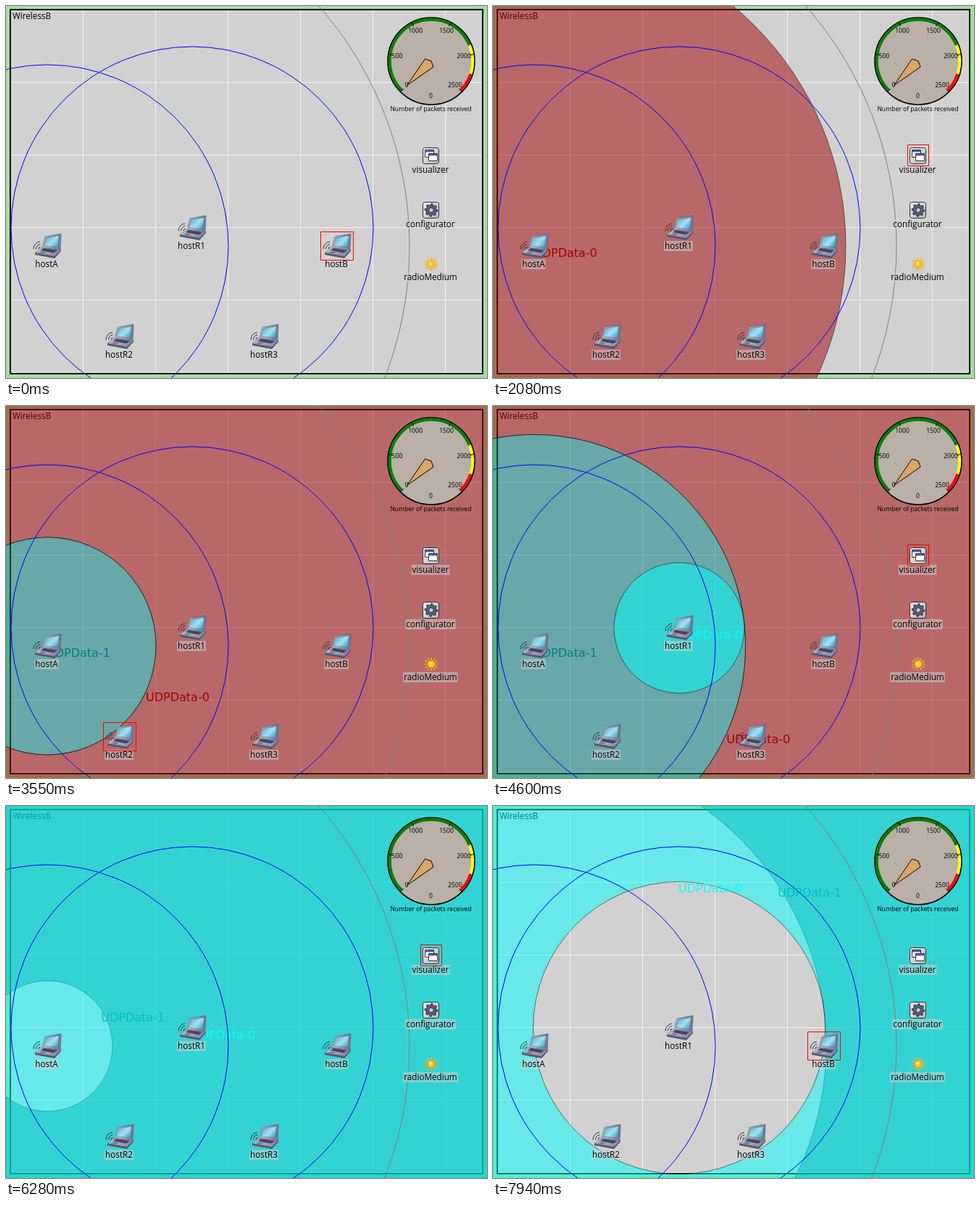
Write an HTML page with a canvas that moves like this. It is 664 px wide and 513 px high and loops after 8 s.

```html
<!DOCTYPE html>
<html lang="en">
<head>
<meta charset="utf-8">
<title>Wireless signal propagation</title>
<style>
  html, body { margin: 0; width: 100%; height: 100%; overflow: hidden; background: #a0e0a0; }
  canvas { display: block; }
</style>
</head>
<body>
<canvas id="stage" width="664" height="513"></canvas>
<script>
const ctx = document.getElementById('stage').getContext('2d');
const TAU = Math.PI * 2, FAR = 1000, LOOP = 8000;
const LABEL_FONT = '11.7px "Open Sans", "Noto Sans", sans-serif';
const SMALL_FONT = '8.6px "Open Sans", "Noto Sans", sans-serif';
const SIGNAL_FONT = '16px "DejaVu Sans", sans-serif';

const hosts = {
  hostA: [57, 331], hostR1: [257, 306], hostB: [457, 331],
  hostR2: [157, 456], hostR3: [357, 456]
};
const [A, R1] = [hosts.hostA, hosts.hostR1];
const HOP = Math.hypot(R1[0] - A[0], R1[1] - A[1]);

// [start ms, highlighted module, phase, wave radius around hostA]
// phase 1: first packet spreads, 2: second packet spreads and R1 relays, 3: both fade out
const steps = [
  [0, 'hostB', 0, 0], [210, 'hostA', 0, 0],
  [630, 'visualizer', 1, 40], [840, 'visualizer', 1, 100], [1040, 'visualizer', 1, 160],
  [1250, 'visualizer', 1, 220], [1460, 'visualizer', 1, 280], [1670, 'visualizer', 1, 340],
  [1870, 'visualizer', 1, 400], [2080, 'visualizer', 1, 430], [2290, 'visualizer', 1, FAR],
  [2710, 'hostA', 1, FAR],
  [3340, 'visualizer', 2, 90], [3550, 'hostR2', 2, 150], [3760, 'visualizer', 2, 190],
  [3970, 'hostR1', 2, HOP],
  [4390, 'visualizer', 2, HOP + 30], [4600, 'visualizer', 2, HOP + 90],
  [4810, 'visualizer', 2, HOP + 150], [5020, 'visualizer', 2, HOP + 180],
  [5230, 'visualizer', 2, HOP + 198], [5440, 'visualizer', 2, HOP * 2],
  [5650, 'hostA', 2, FAR],
  [6070, 'visualizer', 3, 30], [6280, 'visualizer', 3, 90], [6490, 'hostR2', 3, 150],
  [6700, 'visualizer', 3, 190], [6900, 'hostR1', 3, HOP], [7110, 'visualizer', 3, HOP + 30],
  [7320, 'visualizer', 3, HOP + 90], [7530, 'visualizer', 3, HOP + 150],
  [7740, 'visualizer', 3, HOP + 180], [7940, 'hostB', 3, HOP * 2]
];

function poly(points, fill, stroke, width = 1) {
  ctx.beginPath();
  points.forEach(([x, y]) => ctx.lineTo(x, y));
  ctx.closePath();
  paint(fill, stroke, width);
}

function paint(fill, stroke, width = 1) {
  if (fill) { ctx.fillStyle = fill; ctx.fill(); }
  if (stroke) { ctx.strokeStyle = stroke; ctx.lineWidth = width; ctx.stroke(); }
}

function arc(x, y, r, fill, stroke, width, from = 0, to = TAU) {
  ctx.beginPath();
  ctx.arc(x, y, r, from, to);
  paint(fill, stroke, width);
}

function box(x, y, w, h, fill, stroke, radius = 0) {
  ctx.beginPath();
  ctx.roundRect(x, y, w, h, radius);
  paint(fill, stroke);
}

function line(x1, y1, x2, y2, stroke, width = 1) {
  ctx.beginPath();
  ctx.moveTo(x1, y1);
  ctx.lineTo(x2, y2);
  paint(null, stroke, width);
}

function text(str, x, y, font, color = '#000', align = 'center') {
  ctx.font = font;
  ctx.textAlign = align;
  ctx.fillStyle = color;
  ctx.fillText(str, x, y);
}

function gradient(x1, y1, x2, y2, ...colors) {
  const g = ctx.createLinearGradient(x1, y1, x2, y2);
  colors.forEach((c, i) => g.addColorStop(i / (colors.length - 1), c));
  return g;
}

function caption(str, x, y) {
  ctx.font = LABEL_FONT;
  const w = ctx.measureText(str).width;
  box(x - w / 2 - 1, y - 11, w + 2, 14, 'rgba(209,209,209,.5)');
  text(str, x, y, LABEL_FONT);
}

function playground() {
  ctx.fillStyle = '#a0e0a0';
  ctx.fillRect(0, 0, 664, 513);
  ctx.fillStyle = '#d1d1d1';
  ctx.fillRect(6, 5, 652, 502);
  for (let x = 106; x < 658; x += 100) line(x + .5, 5, x + .5, 507, '#f2f2f2');
  for (let y = 105; y < 507; y += 100) line(6, y + .5, 658, y + .5, '#f2f2f2');
  ctx.strokeStyle = '#000';
  ctx.lineWidth = 2;
  ctx.strokeRect(6, 5, 652, 502);
  text('WirelessB', 9, 18, LABEL_FONT, '#000', 'left');
}

function signal([x, y], inner, outer, rgb, name, degrees) {
  if (outer <= 0 || inner >= FAR) return;
  ctx.beginPath();
  ctx.arc(x, y, outer, 0, TAU);
  if (inner > 0) {
    ctx.moveTo(x + inner, y);
    ctx.arc(x, y, inner, 0, TAU);
  }
  ctx.globalAlpha = .5;
  ctx.fillStyle = rgb;
  ctx.fill('evenodd');
  paint(null, '#000');
  ctx.globalAlpha = 1;
  const angle = degrees * Math.PI / 180;
  text(name, x - 1 + inner * Math.cos(angle), y + 15 + inner * Math.sin(angle),
    SIGNAL_FONT, rgb, 'left');
}

function signals(phase, r) {
  const relay = r >= FAR ? FAR : Math.max(0, r - HOP);
  const pick = (...byPhase) => byPhase[phase];
  signal(A, pick(0, 0, r, FAR), pick(0, r, FAR, FAR), '#a00000', 'UDPData-0', 24);
  signal(A, pick(0, 0, 0, r), pick(0, 0, r, FAR), '#008080', 'UDPData-1', -33.2);
  signal(R1, pick(0, 0, 0, relay), pick(0, 0, relay, FAR), '#00ffff', 'UDPData-0', -90);
}

function laptop(name, [x, y]) {
  ctx.save();
  ctx.translate(x, y);
  for (const r of [3, 6.5, 10]) arc(-9, 4, r, null, '#333', 1, 3.1, 4.6);
  poly([[-17, 9], [10, 14], [19, 5], [19, 7], [10, 17], [-17, 12]], '#55566e');
  poly([[-17, 9], [-7, 2], [19, 5], [10, 14]],
    gradient(-17, 9, 15, 8, '#c0c0d0', '#8587a4'), '#6b6c86', .6);
  poly([[-9, 6], [-5, 3], [14, 6], [9, 9.5]], '#44455c');
  poly([[-12, 9], [-8, 7.2], [-1, 8.5], [-5, 10.5]], '#77789a');
  poly([[-3, -13], [19, -17], [18, 5], [-7, 2]],
    gradient(-5, 0, 19, 0, '#d0d2dc', '#73758e'), '#606278', .7);
  poly([[-1.5, -11.5], [16.5, -14.5], [15, 2], [-5, 0]],
    gradient(-2, -12, 14, 3, '#62b4d8', '#a5dff0', '#3599c4'), '#40627a', .6);
  ctx.restore();
  caption(name, x - 1, y + 29);
}

function windowIcon(x, y) {
  box(x, y, 12, 10, '#fff', '#333');
  ctx.fillStyle = '#5361ac';
  ctx.fillRect(x + .5, y + .5, 11, 2.5);
}

function tile(y) {
  box(575.5, y - 10.5, 22, 22, gradient(575, y - 11, 598, y + 11, '#eee', '#b8b8b8'), '#333', 3);
}

function modules() {
  tile(206);
  windowIcon(578.5, 198.5);
  windowIcon(583.5, 203.5);
  caption('visualizer', 586, 230);

  tile(281);
  const gear = [];
  for (let i = 0; i < 32; i++) {
    const r = i % 4 < 2 ? 9 : 6.8, a = i / 32 * TAU;
    gear.push([587 + r * Math.cos(a), 281.5 + r * Math.sin(a)]);
  }
  poly(gear, '#555d7c', '#222', .8);
  arc(587, 281.5, 3.2, '#c4c8d8', '#222', .8);
  caption('configurator', 586, 305);

  for (let i = 0; i < 12; i++) {
    const a = i / 12 * TAU, c = Math.cos(a), s = Math.sin(a);
    line(587 + 6 * c, 356 + 6 * s, 587 + 9.5 * c, 356 + 9.5 * s, '#f0b020', 1.5);
  }
  arc(587, 356, 5, '#ffc81e', '#e89a10', 1);
  arc(586, 355, 2, '#ffe878');
  caption('radioMedium', 586, 378);
}

function gauge() {
  const x = 587, y = 76, start = Math.PI * .75, sweep = Math.PI * 1.5;
  arc(x, y, 60, '#b9b0a7', '#000', 1.6);
  const band = (color, from, to) =>
    arc(x, y, 57.2, null, color, 4, start + sweep * from, start + sweep * to);
  band('#008000', 0, .75);
  band('#ffff00', .75, .9);
  band('#ff0000', .9, 1);
  for (let i = 0; i <= 5; i++) {
    const a = start + sweep * i / 5, c = Math.cos(a), s = Math.sin(a);
    line(x + 54 * c, y + 54 * s, x + 60 * c, y + 60 * s, '#000');
  }
  poly([[553.5, 109.5], [578.5, 73], [587, 76], [590, 84]], '#dfa468', '#000');
  const marks = [[553, 112], [540, 72], [565, 37], [608, 37], [632, 72], [620, 112]];
  marks.forEach(([mx, my], i) => text(String(i * 500), mx, my, SMALL_FONT));
  text('0', 586.5, 127, SMALL_FONT);
  text('Number of packets received', 586.5, 145, SMALL_FONT);
}

function highlight(name) {
  if (name === 'visualizer') return box(572.5, 191.5, 29, 29, null, '#f00');
  const [x, y] = hosts[name];
  box(x - 22.5, y - 19.5, 45, 39, null, '#f00');
}

function draw() {
  const t = performance.now() % LOOP;
  const [, active, phase, radius] = steps.findLast(step => step[0] <= t);
  playground();
  signals(phase, radius);
  arc(...A, 500, null, '#808080', 1);
  arc(...A, 250, null, '#00f', 1);
  arc(...R1, 250, null, '#00f', 1);
  gauge();
  modules();
  for (const name in hosts) laptop(name, hosts[name]);
  highlight(active);
  requestAnimationFrame(draw);
}
draw();
</script>
</body>
</html>
```
